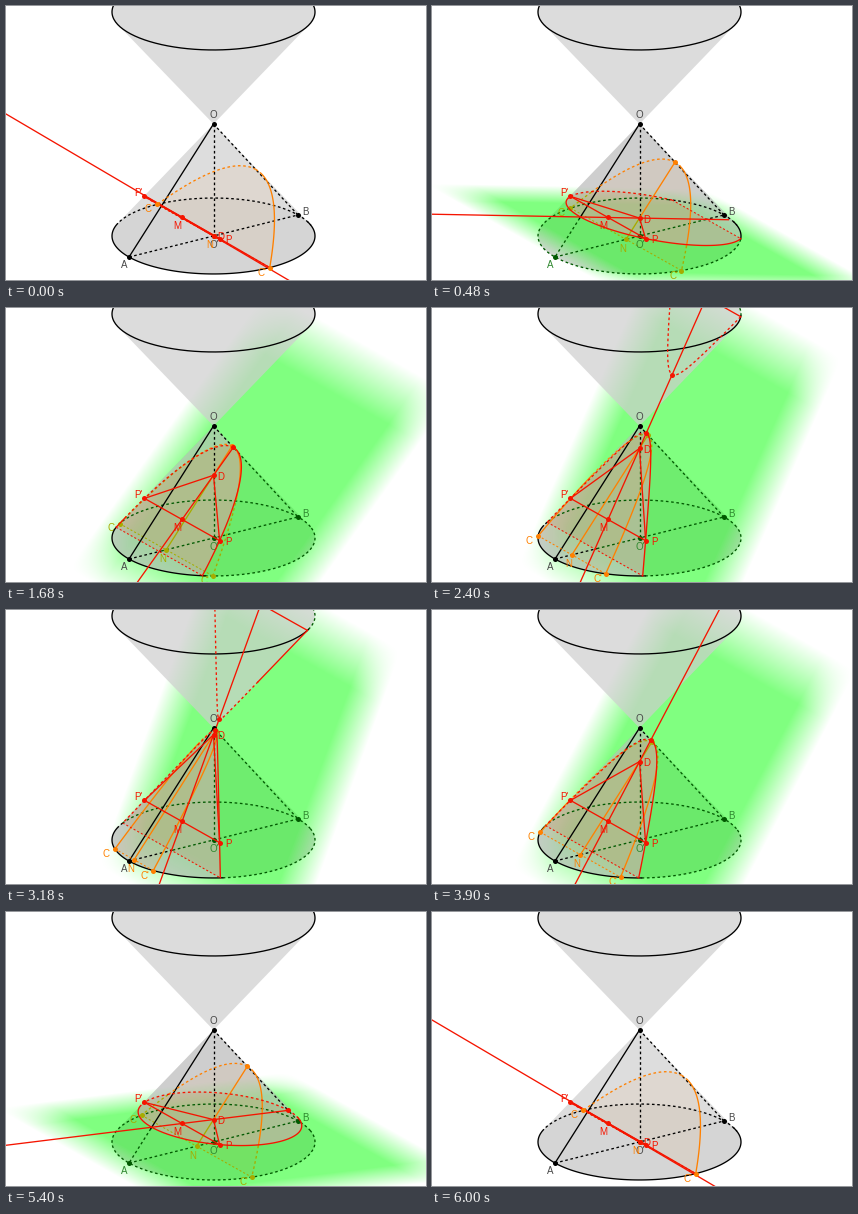
A matplotlib script that plays this animation: 420 by 274 pixels, repeating every 6060 ms.

```python
import numpy as np
import matplotlib.pyplot as plt
from matplotlib.animation import FuncAnimation
from matplotlib.colors import to_rgb

W, H, STEPS = 420, 274, 50
CX, CY = 207.5, 230.0
SIN, COS = 0.374, 0.9274          # camera elevation
R, HT = 101.5, 112 / COS          # cone radius and height
K = R / HT
SM, ZM = 37.8, 28.4               # position of M in the plane OAB

AX = np.array([-0.8325, -0.554, 0])
AX /= np.linalg.norm(AX)
UX = np.array([-AX[1], AX[0], 0])  # direction of the chord PP'
UP = np.array([0, 0, 1.0])
VIEW = np.array([0, -COS, SIN])
RED, ORANGE, BLACK = "#f51400", "#ff8000", "#000000"
GREY = "#484848"

O, BASE = HT * UP, 0 * UP
A, B = R * AX, -R * AX
M = SM * AX + ZM * UP
HALF = np.sqrt((R - K * ZM) ** 2 - SM ** 2)
P, P2 = M + HALF * UX, M - HALF * UX

fig = plt.figure(figsize=(W / 100, H / 100), dpi=100, facecolor="white")
ax = fig.add_axes([0, 0, 1, 1])
gx, gy = np.meshgrid(np.arange(W) + 0.5, np.arange(H) + 0.5)


def project(p):
    p = np.asarray(p, float)
    return np.stack([CX + p[..., 0],
                     CY - SIN * p[..., 1] - COS * p[..., 2]], -1)


def rim(z, n=181):
    t = np.linspace(0, 2 * np.pi, n) + 0.3
    return np.stack([R * np.cos(t), R * np.sin(t), np.full(n, z)], -1)


def segment(p, q, n=90):
    t = np.linspace(0, 1, n)[:, None]
    return p + t * (q - p)


def facing(p):
    """True where a point of the cone's side is turned to the camera."""
    rho = np.maximum(np.hypot(p[:, 0], p[:, 1]), 1e-6)
    tilt = np.where(p[:, 2] > HT, -R, R)
    return -HT * p[:, 1] / rho * COS + tilt * SIN > 0


def veiled(color):
    """Colour as seen through the green plane."""
    return 0.65 * np.array(to_rgb(color)) + (0, 0.35, 0)


def hull(pts):
    pts = sorted(map(tuple, pts))

    def chain(seq):
        out = []
        for x, y in seq:
            while len(out) > 1 and (
                    (out[-1][0] - out[-2][0]) * (y - out[-2][1])
                    - (out[-1][1] - out[-2][1]) * (x - out[-2][0])) <= 0:
                out.pop()
            out.append((x, y))
        return out[:-1]
    return chain(pts) + chain(pts[::-1])


def fill(pts, color, alpha, z):
    if len(pts) > 2:
        ax.fill(*np.asarray(pts).T, color=color, alpha=alpha, lw=0, zorder=z)


class Section:
    """Cut of the cone by the plane through D with slope q along AB."""

    def __init__(self, d, q):
        self.d, self.q = d, q
        c, e = K * (HT - d), K * q
        self.open = e >= 1 - 1e-9
        self.top = -c / (1 + e)
        self.far = c / (1 - e) if abs(1 - e) > 1e-9 else np.inf
        self.foot = d / q
        lo = self.top if q > 0 else max(self.top, self.foot)
        hi = np.inf if self.open else self.far
        if q > 0:
            hi = min(hi, self.foot)
        self.span = lo, hi

    def point(self, s):
        return s * AX + (self.d - self.q * s) * UP

    def branches(self, lo, hi):
        s = lo + (hi - lo) * (1 - np.cos(np.linspace(0, np.pi, 120))) / 2
        z = self.d - self.q * s
        w = np.sqrt(np.maximum((R - K * z) ** 2 - s ** 2, 0))
        mid = s[:, None] * AX + z[:, None] * UP
        return mid - w[:, None] * UX, mid + w[:, None] * UX

    def chord(self):
        w = np.sqrt(max(R * R - self.foot ** 2, 0))
        n = self.foot * AX
        return n - w * UX, n + w * UX


def green(q):
    """Alpha of the cutting plane with its soft borders."""
    tilt = np.arctan(q)
    sine = max(abs(np.sin(tilt)), 0.05)
    ahead, back = 202 + 53 * tilt, min(158, 14 + 62 / sine)
    if q < 0:
        ahead, back = min(ahead, 14 + 62 / sine), 158
    w = (q * UP - AX) / np.hypot(1, q)
    e1, e2 = project(UX) - (CX, CY), project(w) - (CX, CY)
    m = project(M)
    det = e1[0] * e2[1] - e1[1] * e2[0]
    dx, dy = gx - m[0], gy - m[1]
    u = (dx * e2[1] - dy * e2[0]) / det
    v = (dy * e1[0] - dx * e1[1]) / det

    def fade(t, lo, hi):
        return np.clip(np.minimum(t - lo, hi - t) / (0.17 * (hi - lo)), 0, 1)
    img = np.zeros((H, W, 4))
    img[..., 1] = 1
    img[..., 3] = 0.5 * fade(u, -102, 236) * fade(v, -back, ahead)
    return img


def draw(i):
    ax.cla()
    ax.set_axis_off()
    p = (i if i <= STEPS else 2 * STEPS - i) / STEPS
    d = p * HT
    q = (d - ZM) / SM
    D = d * UP
    red, par = Section(d, q), Section(d, 1 / K)
    normal = np.cross(UX, q * UP - AX)
    normal /= np.linalg.norm(normal)
    if normal @ VIEW < 0:
        normal = -normal

    def behind(pts):
        if p == 0:
            return np.zeros(len(pts), bool)
        return (pts - M) @ normal < -0.5

    def path(pts, color, dashed=False, keep=False, lw=0.95):
        back = behind(pts)
        dash = np.broadcast_to(dashed, back.shape)
        if not keep:
            dash = dash | back
        state = back * 2 + dash
        cuts = [0, *(np.flatnonzero(np.diff(state)) + 1), len(pts)]
        xy = project(pts)
        for a, b in zip(cuts[:-1], cuts[1:]):
            style = (0, (2, 2)) if dash[a] else "-"
            ax.plot(*xy[a:b + 1].T, lw=lw, ls=style, dash_capstyle="butt",
                    color=veiled(color) if back[a] else color,
                    zorder=3.5 if back[a] else 4)

    def dot(pt, color, name="", dx=0, dy=0, ink=None):
        back = behind(pt[None])[0]
        ink = ink or color
        if back:
            color, ink = veiled(color), veiled(ink)
        x, y = project(pt)
        ax.plot(x, y, "o", ms=3.6, mew=0, color=color,
                zorder=3.6 if back else 5)
        if name:
            ax.text(x + dx, y + dy, name, color=ink, fontsize=7,
                    family="Liberation Sans", ha="center",
                    va="center_baseline", zorder=3.7 if back else 6)

    # cone surfaces; the upper one stands in front of the plane
    low, high = rim(0), rim(2 * HT)
    fill(hull(project(np.vstack([low, O]))), "black", 0.135, 0)
    fill(project(low), "black", 0.035, 0.1)
    fill(hull(project(np.vstack([high, O]))), "#cecece", 0.7, 2.5)

    # cutting plane and the part of the cone in front of it
    cut = red.branches(*red.span)
    if p > 0:
        ax.imshow(green(q), extent=(0, W, H, 0), zorder=2, aspect="auto",
                  interpolation="nearest")
        front = np.vstack([O[None], *cut, low[~behind(low)]])
        fill(hull(project(front)), "#c6c6c6", 0.62, 3)
        fill(project(np.vstack([cut[0], cut[1][::-1]])), RED, 0.09, 3.1)
    arcs = par.branches(*par.span)
    fill(project(np.vstack([arcs[0], arcs[1][::-1]])), ORANGE, 0.06, 3.2)

    # cone edges
    path(low, BLACK, ~facing(low))
    path(high, BLACK)
    path(segment(O, A), BLACK)
    for a, b in ((O, B), (O, BASE), (A, B)):
        path(segment(a, b), BLACK, True)

    # parabola parallel to OA
    C, C2 = par.chord()
    N, tip = par.point(par.foot), par.point(par.top)
    for arc in arcs:
        path(arc, ORANGE, ~facing(arc))
    path(segment(C, C2), ORANGE, True, lw=0.75)
    if p > 0:
        path(segment(N, tip), ORANGE, keep=True)

    # section through P, P' and D
    for arc in cut:
        path(arc, RED, ~facing(arc))
    if abs(red.foot) < R:
        path(segment(*red.chord()), RED, True, lw=0.75)
    if red.open and red.far < 0:
        lo = (d - 2 * HT) / q
        if lo < red.far:
            for arc in red.branches(lo, red.far):
                path(arc, RED, ~facing(arc))
            end = red.branches(lo, lo + 1e-6)
            path(segment(end[0][0], end[1][0]), RED)
    for a, b in ((P, P2), (P2, D), (D, P)):
        path(segment(a, b, 2), RED)
    start = -600 if red.open else red.top
    path(segment(red.point(start), red.point(600), 2), RED)

    # points and labels
    dot(O, BLACK, "O", 0, -10.5, GREY)
    dot(BASE, BLACK, "O'", 0.5, 7.5, GREY)
    dot(A, BLACK, "A", -5, 6.5, GREY)
    dot(B, BLACK, "B", 7, -4, GREY)
    dot(C, ORANGE, "C", -9, 3.8)
    dot(C2, ORANGE, "C'", -8, 4)
    dot(N, ORANGE, "N", -3.5, 8.3)
    if p > 0:
        dot(tip, ORANGE)
    if red.d - red.q * red.top >= 0:
        dot(red.point(red.top), RED)
    if red.open and red.far < 0:
        dot(red.point(red.far), RED)
    dot(M, RED, "M", -5, 7.5)
    dot(P, RED, "P", 9, 0.5)
    dot(P2, RED, "P'", -6, -4)
    dot(D, RED, "D", 7, 0.5)

    ax.set_xlim(0, W)
    ax.set_ylim(H, 0)
    return []


anim = FuncAnimation(fig, draw, frames=2 * STEPS + 1, interval=60,
                     init_func=lambda: [], repeat=True, repeat_delay=0)
plt.show()
```
